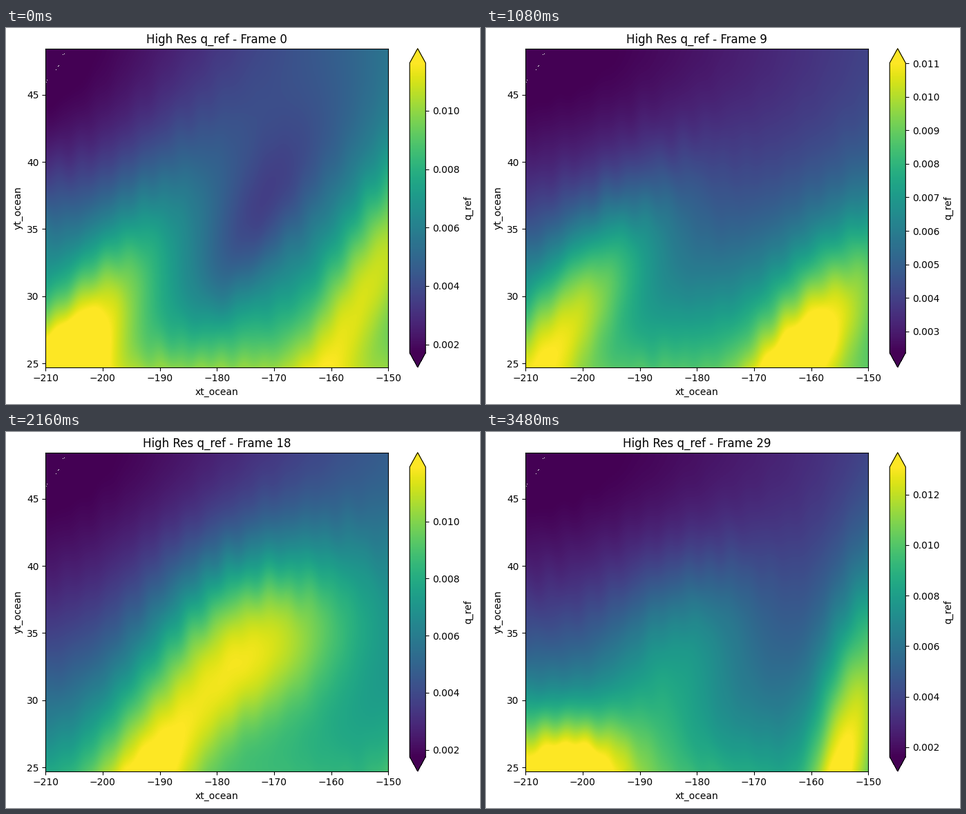
Write a matplotlib script that moves like this. It is 686 by 545 pixels and loops after 3600 ms.

```python
import numpy as np
import matplotlib.pyplot as plt
from matplotlib.animation import FuncAnimation

W, H = 686, 545
LEFT, BOTTOM, WIDE, HIGH = 57.2, 53.28, 496, 462
FRAMES, STEP = 30, 120

# u runs west to east, v south to north, both 0..1
u = (np.arange(WIDE)[None, :] + .5) / WIDE
v = 1 - (np.arange(HIGH)[:, None] + .5) / HIGH
rng = np.random.default_rng(4)
WAVES = [(rng.uniform(40, 110), rng.uniform(-25, 25), rng.uniform(0, 2 * np.pi))
         for _ in range(8)]
COAST = [(27, 7), (25, 8), (19, 24), (18, 25), (15, 30), (2, 45), (1, 48)]


def track(times, **props):
    """Properties that run linearly between the given times; scalars stay fixed."""
    def at(frame):
        return {name: np.interp(frame, times, np.broadcast_to(val, len(times)))
                for name, val in props.items()}
    return at


# Dry air in the north over a moist southern edge
backdrop = track((0, 5, 9, 13, 18, 23, 29),
                 lo=(.001717, .0023, .002362, .00147, .001758, .001332, .001617),
                 hi=(.01163, .013106, .01101, .012076, .01191, .010388, .013093),
                 north=(.38, .27, .2, .42, .28, .38, .17),
                 west=(.83, .55, .72, .6, .58, .88, .8),
                 east=(.83, .88, .72, .82, .65, .87, .5),
                 power=(2.5, 1.8, 1.8, 2.3, 1.8, 2.2, 1.9))

# Moist (or dry, with negative gain) plumes crossing eastwards
plumes = [
    track((0, 5, 9, 13), x=(.05, .45, .78, 1.2), lean=.5, width=.13,
          foot=.05, reach=(.6, .75, .4, .4), gain=(.53, .53, .5, .4)),
    track((0, 5), x=(.82, 1.35), lean=.45, width=.1, foot=.35, reach=.4, gain=.38),
    track((0, 5), x=(.42, .9), lean=.42, width=.07, foot=.45, reach=.3, gain=(-.13, 0)),
    track((5, 9, 13, 18), x=(-.35, .05, .67, 1.2), lean=.5, width=.12,
          foot=.2, reach=(.35, .35, .5, .5), gain=.42),
    track((9, 13, 18, 23, 29), x=(-.3, -.03, .3, .55, .92), lean=(.05, .05, .45, .3, .2),
          width=(.05, .05, .16, .16, .085), foot=(.42, .42, .1, .2, .1),
          reach=(.22, .22, .5, .55, .6), gain=(.4, .4, .5, .36, .55)),
    track((13, 18, 23), x=(.42, .62, .85), lean=.15, width=.18,
          foot=.42, reach=.3, gain=(0, .42, 0)),
    track((18, 23, 29), x=(.7, .9, 1.1), lean=0, width=.15,
          foot=.22, reach=.25, gain=(0, -.25, 0)),
    track((23, 29), x=(-.3, .13), lean=0, width=.17, foot=0, reach=.18, gain=(0, .45)),
    track((23, 29), x=(.15, .35), lean=.25, width=.14, foot=.4, reach=.3, gain=(0, .25)),
]


def bell(d):
    return np.exp(-d ** 2)


def humidity(frame):
    """Field in physical units with its colour range."""
    b = backdrop(frame)
    drift = u - .06 * frame
    h = v + .0022 * sum(np.sin(kx * drift + ky * v + p) for kx, ky, p in WAVES)
    north = -.03 + (b["north"] + .03) * u ** 1.5
    south = b["west"] + (b["east"] - b["west"]) * u
    t = north + (south - north) * np.clip(1 - h, 0, 1) ** b["power"]
    for plume in plumes:
        p = plume(frame)
        if p["gain"]:
            across = (u - p["x"] - p["lean"] * h) / (p["width"] * (1 + 1.2 * h))
            t += p["gain"] * bell(across) * bell((h - p["foot"]) / p["reach"])
    field = b["lo"] + (b["hi"] - b["lo"]) * t
    for col, row in COAST:
        field[row, col] = np.nan
    return field, b["lo"], b["hi"]


fig = plt.figure(figsize=(W / 100, H / 100), dpi=100)


def panel(x, width):
    return fig.add_axes([x / W, BOTTOM / H, width / W, HIGH / H])


ax = panel(LEFT, WIDE)
field, lo, hi = humidity(0)
im = ax.imshow(field, extent=(-210, -150, 24.715, 48.44), aspect="auto",
               cmap="viridis", vmin=lo, vmax=hi, interpolation="nearest")
ax.set(xlabel="xt_ocean", ylabel="yt_ocean")
title = ax.set_title("")
fig.colorbar(im, cax=panel(LEFT + WIDE + 31, 23.1), extend="both", label="q_ref")


def draw(frame):
    field, lo, hi = humidity(frame)
    im.set_data(field)
    im.set_clim(lo, hi)
    title.set_text(f"High Res q_ref - Frame {frame}")
    return im, title


anim = FuncAnimation(fig, draw, frames=FRAMES, interval=STEP, repeat=True)
plt.show()
```
